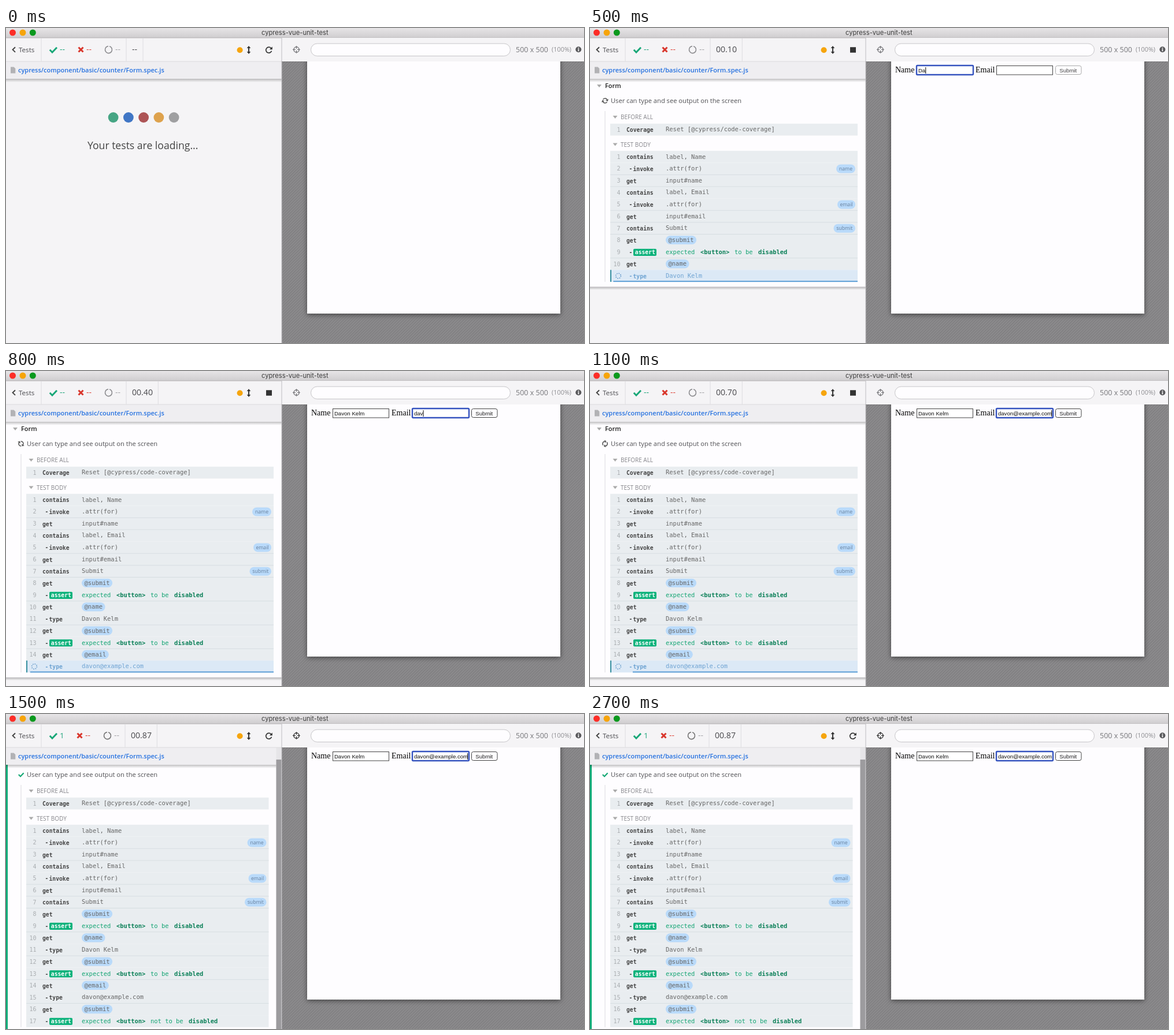
Write an HTML page that moves like this. It is 1000 px wide and 546 px high and loops after 2800 ms.

```html
<!DOCTYPE html>
<html lang="en">
<head>
<meta charset="utf-8">
<title>cypress-vue-unit-test</title>
<style>
html, body { margin: 0; width: 100%; height: 100%; overflow: hidden; }
svg { display: block; width: 1000px; height: 546px; background: #f5f4f6; }
text { font-family: "Open Sans", sans-serif; fill: #555; white-space: pre; }
.title { font-family: Inter, sans-serif; font-size: 11.2px; fill: #3c3c3c; }
.mono { font: 10.46px "DejaVu Sans Mono", monospace; fill: #666; }
.num { font: 10px "DejaVu Sans Mono", monospace; fill: #a9adb0; text-anchor: end; }
.cmd { font: bold 9.7px "DejaVu Sans Mono", monospace; fill: #444; }
.ok { fill: #12a472; }
.okb { fill: #0b8058; font-weight: bold; }
.serif { font: 14px "Liberation Serif", serif; fill: #000; }
.field { font: 9.65px "Liberation Sans", sans-serif; fill: #111; }
.busy { fill: #6ea3d2; }
.line { fill: none; }
</style>
</head>
<body>
<svg id="stage" viewBox="0 0 1000 546"></svg>
<script>
const LOOP = 2800, STEP = 100, ROW = 20.64, BODY = 212.9;
const NAME = 'Davon Kelm', EMAIL = 'davon@example.com';
const stage = document.getElementById('stage');
const ctx = document.createElement('canvas').getContext('2d');

const esc = s => s.replace(/</g, '&lt;').replace(/>/g, '&gt;');
const text = (x, y, s, cls = '', style = '') =>
  `<text x="${x}" y="${y}" class="${cls}" style="${style}">${esc(s)}</text>`;
const ui = (x, y, s, size, fill, weight = 400) =>
  text(x, y, s, '', `font-size:${size}px;fill:${fill};font-weight:${weight}`);
const rect = (x, y, w, h, fill, extra = '') =>
  `<rect x="${x}" y="${y}" width="${w}" height="${h}" fill="${fill}" ${extra}/>`;
const circle = (x, y, r, fill, extra = '') =>
  `<circle cx="${x}" cy="${y}" r="${r}" fill="${fill}" ${extra}/>`;
const path = (d, stroke, width, extra = '') =>
  `<path class="line" d="${d}" stroke="${stroke}" stroke-width="${width}" ${extra}/>`;
const fill = (d, color) => `<path d="${d}" fill="${color}"/>`;
const triangle = (x, y) => fill(`M${x} ${y}h8l-4 5z`, '#aaa');
const vline = x => rect(x, 18, 1, 40, '#dddcdf');

const defs = `<defs>
  <linearGradient id="bar" x2="0" y2="1"><stop stop-color="#e7e5e7"/><stop offset="1" stop-color="#cfcdcf"/></linearGradient>
  <linearGradient id="shade" x2="0" y2="1"><stop stop-color="#000" stop-opacity=".24"/><stop offset="1" stop-opacity="0"/></linearGradient>
  <pattern id="hatch" width="3.5" height="3.5" patternUnits="userSpaceOnUse" patternTransform="rotate(45)">
    <rect width="3.5" height="3.5" fill="#8c8b8d"/><rect width="1.2" height="3.5" fill="#7d7c7e"/></pattern>
  <filter id="drop" x="-10%" y="-10%" width="120%" height="120%">
    <feDropShadow dx="0" dy="2" stdDeviation="4" flood-opacity=".5"/></filter>
</defs>`;

// Each command: name, argument, alias pill
const commands = [
  ['contains', 'label, Name'], ['-invoke', '.attr(for)', 'name'], ['get', 'input#name'],
  ['contains', 'label, Email'], ['-invoke', '.attr(for)', 'email'], ['get', 'input#email'],
  ['contains', 'Submit', 'submit'],
  ['get', '@submit'], ['-assert', 'to be'],
  ['get', '@name'], ['-type', NAME],
  ['get', '@submit'], ['-assert', 'to be'],
  ['get', '@email'], ['-type', EMAIL],
  ['get', '@submit'], ['-assert', 'not to be']
];
const pillWidth = { name: 33, email: 31, submit: 37.5 };

function command([name, arg, alias], n, top, right, progress) {
  const busy = progress >= 0, y = top + ROW / 2, base = y + 3.6;
  const child = name[0] === '-', label = child ? name.slice(1) : name;
  const tone = busy ? ' busy' : '';
  let s = rect(35, top, right - 35, ROW, busy ? '#dce9f6' : '#e9edf0');
  if (!child && n > 1) s += rect(35, top - .4, right - 35, 1, '#d6dde1');
  if (busy) {
    const x = 35 + (right - 35) * progress;
    s += rect(35, top, 2, ROW, '#37909f') + rect(x, top + ROW - 1.8, right - x, 2, '#5d9fd6')
      + circle(49, y, 4.4, 'none', 'stroke="#6398c8" stroke-width="1.6" stroke-dasharray="1.6 1.85"');
  } else s += text(52.5, base, String(n), 'num');
  if (child) s += text(67.5, base, '-', 'cmd' + tone);
  if (label === 'assert') {
    s += rect(75, y - 5.6, 40, 12.2, '#0cb27b', 'rx="2"') + text(77.8, base + .3, label, 'cmd', 'fill:#fff')
      + text(131, base, 'expected', 'mono ok') + text(191, base, '<button>', 'mono okb')
      + text(250, base, arg, 'mono ok') + text(arg === 'to be' ? 291 : 316, base, 'disabled', 'mono okb');
    return s;
  }
  s += text(child ? 74.5 : 63, base + .5, label, 'cmd' + tone);
  if (arg[0] === '@') s += rect(131, y - 7.8, arg.length * 6.3 + 9, 15.2, '#b9dafa', 'rx="7.6"');
  s += text(arg[0] === '@' ? 135.5 : 131, base - .3, arg, 'mono' + tone);
  if (alias) {
    const w = pillWidth[alias], x = right - 4 - w;
    s += rect(x, y - 7.4, w, 15, '#b9dafa', 'rx="7.5"')
      + text(x + w / 2, y + 3, alias, '', 'font-size:8.7px;fill:#667f9c;text-anchor:middle');
  }
  return s;
}

function loader() {
  return ['#46a584', '#4076c5', '#ad5456', '#dea24d', '#9f9fa1']
    .map((c, i) => circle(185.6 + i * 26.25, 155, 8.9, c)).join('')
    + ui(141, 210, 'Your tests are loading...', 17.6, '#444');
}

function testList(t, done) {
  const count = t < 500 ? 0 : t < 800 ? 11 : t < 1200 ? 15 : 17;
  const scrolled = count === 17, right = scrolled ? 454.5 : 463;
  const start = count === 11 ? 450 : 736;
  const end = count ? BODY + count * ROW : 186.5;
  let s = rect(0, end + 9, 477, 5, 'url(#shade)') + rect(0, 80, 477, end + 9 - 80, '#fefdff')
    + rect(0, end + 8.5, 477, 1, '#c4c3c6') + triangle(12, 98) + ui(26, 104, 'Form', 10.9, '#1c1c1c', 600);
  s += done
    ? path('M21.8 126l3.2 3.2 5.6-6', '#14a874', 2.2)
    : `<g transform="translate(26 126) rotate(${(t - 400) * .18})">`
      + path('M-4-.8a4 4 0 0 1 7.2-1.6M4 .8a4 4 0 0 1-7.2 1.6', '#555', 1.5)
      + fill('M4.8-4.6v4h-4zM-4.8 4.6v-4h4z', '#555') + '</g>';
  s += ui(36, 129.8, 'User can type and see output on the screen', 11.15, '#505054')
    + rect(25.5, 144, 1, end - 144, '#dcdcdf')
    + triangle(39.5, 152) + ui(53, 158.3, 'BEFORE ALL', 10, '#85858a')
    + command(['Coverage', 'Reset [@cypress/code-coverage]'], 1, 165.8, right, count ? -1 : 0);
  if (count) {
    s += triangle(39.5, 199.5) + ui(53, 205.8, 'TEST BODY', 10, '#85858a');
    for (let i = 0; i < count; i++)
      s += command(commands[i], i + 1, BODY + i * ROW, right,
        !scrolled && i === count - 1 ? (t - start) / 4000 : -1);
  }
  s = `<g transform="translate(0 ${scrolled ? -21 : 0})">${s}</g>`;
  if (done) s += rect(0, 88, 3, 458, '#10ac78');
  return s;
}

function header(t, running, done) {
  const dx = done ? -2 : 0;
  const time = done ? '00.87' : running ? '00.' + String((t - 400) / 10).padStart(2, '0') : '--';
  let s = rect(0, 88, 477, 6, 'url(#shade)') + rect(0, 58, 477, 30, '#efeef1');
  if (t >= 1200) s += rect(467.5, 58, 9, 488, '#e6e5e8') + rect(467.5, 79, 9, 467, '#9c9b9e');
  s += fill('M8 67.5h5.5l2.8 2.8v8.2H8z', '#b2b2b5')
    + ui(21, 77.2, 'cypress/component/basic/counter/Form.spec.js', 11, '#2370e0', 600)
    + rect(0, 17, 1000, 41, '#f5f4f6') + rect(0, 57.5, 477, 1, '#dcdbde')
    + rect(0, 0, 1000, 17, 'url(#bar)') + rect(0, 16.5, 1000, 1, '#b4b2b4')
    + circle(11.5, 8, 5.5, '#fc2d27') + circle(29, 8, 5.5, '#f6a40b') + circle(46.3, 8, 5.5, '#0b991e')
    + text(442, 12.2, 'cypress-vue-unit-test', 'title')
    + path('M16 33.3l-4.4 4.3 4.4 4.3', '#444', 2) + ui(22, 42, 'Tests', 11.6, '#48484c')
    + vline(60.5) + vline(207.5 + dx) + vline(running ? 262.8 + dx : 236.5)
    + path('M75.8 37.8l4.2 4.4 8-8.4', '#17a777', 3) + ui(93, 42.2, done ? '1' : '--', done ? 13.5 : 14, '#22a67c')
    + path(`M${125.5 + dx} 33.5l8 8m0-8l-8 8`, '#d9362c', 3) + ui(139 + dx, 42.2, '--', 14, '#de463b')
    + circle(177.5 + dx, 37.6, 6, 'none', `stroke="${done ? '#777' : '#8e8e91'}" stroke-width="1.6" stroke-dasharray="34.7 3" transform="rotate(-76 ${177.5 + dx} 37.6)"`)
    + ui(189 + dx, 42.2, '--', 14, '#a6a6a9')
    + ui(218 + dx, 42.3, time, 14.1, '#48484c')
    + circle(404.6, 38.2, 5, '#f6a50e')
    + path('M420 34v8', '#333', 2) + fill('M420 31l3.3 4h-6.6zM420 45l3.3-4h-6.6z', '#333');
  s += running && !done
    ? rect(450, 33.2, 10, 9.5, '#333')
    : path('M458.6 35a5 5 0 1 0 .9 4.8', '#333', 1.7) + fill('M460.8 32.2v5h-5z', '#333');
  return s;
}

function preview(done) {
  const ink = done ? '#333' : '#77777b';
  return rect(477, 58, 523, 488, 'url(#hatch)') + rect(521, 50, 438, 445, '#fefdff', 'filter="url(#drop)"')
    + rect(477, 17, 523, 41, '#f5f4f6') + rect(476.5, 17, 1, 529, '#bdbcbf')
    + rect(477, 58, 523, 1, '#000', 'opacity=".12"') + rect(521, 58, 438, 2, '#fefdff')
    + circle(502.5, 37.4, 4.6, 'none', `stroke="${ink}" stroke-width="1.4"`)
    + path('M502.5 31v4.8m0 3.2v4.8M496 37.4h4.8m3.2 0h4.8', ink, 1.4)
    + rect(527.5, 27, 345, 21.5, '#fefdff', 'rx="10.75" stroke="#c6c5c8"')
    + ui(882, 41.6, '500 x 500', 12.5, '#77777b') + ui(944, 41.2, '(100%)', 10.9, '#8d8d91')
    + circle(990.4, 37.3, 5, '#58585b') + rect(989.6, 34, 1.7, 1.6, '#fff') + rect(989.6, 36.4, 1.7, 4, '#fff');
}

function input(x, value, focused, caret) {
  let s = rect(x + .5, 65.5, 97, 15.5, '#fff', 'stroke="#444" stroke-width="1"');
  if (focused) s += rect(x, 65, 98, 16, 'none', 'rx="1.5" stroke="#3553bf" stroke-width="2.4"');
  s += text(x + 2.9, 76.8, value, 'field');
  if (focused && caret) {
    ctx.font = '9.65px "Liberation Sans", sans-serif';
    const end = Math.min(x + 3 + ctx.measureText(value).width, x + 95.2);
    s += rect(end, 68, 1, 11, '#000');
  }
  return s;
}

function form(t) {
  const typed = (word, from, pace) => word.slice(0, Math.max(0, Math.floor((t - from) / pace)));
  const name = typed(NAME, 450, 25), email = typed(EMAIL, 736, 21);
  const caret = t < 1100 || (t - 1100) % 1000 < 500;
  return text(528, 77, 'Name', 'serif') + input(565, name, t < 750, true)
    + text(667, 77, 'Email', 'serif') + input(703, email, t >= 750, caret)
    + rect(805.5, 65.5, 44.5, 15, '#fefdff', `rx="3" stroke="${email ? '#444' : '#aaa'}"`)
    + text(812.3, 76.8, 'Submit', 'field', `fill:${email ? '#222' : '#444'}`);
}

function draw(t) {
  const running = t >= 400, done = t >= 1300;
  stage.innerHTML = defs + (running ? testList(t, done) : loader())
    + header(t, running, done) + preview(done) + (t >= 500 ? form(t) : '');
}

let shown = -1;
function tick() {
  const t = Math.floor(performance.now() % LOOP / STEP) * STEP;
  if (t !== shown) draw(shown = t);
  requestAnimationFrame(tick);
}
tick();
</script>
</body>
</html>
```
